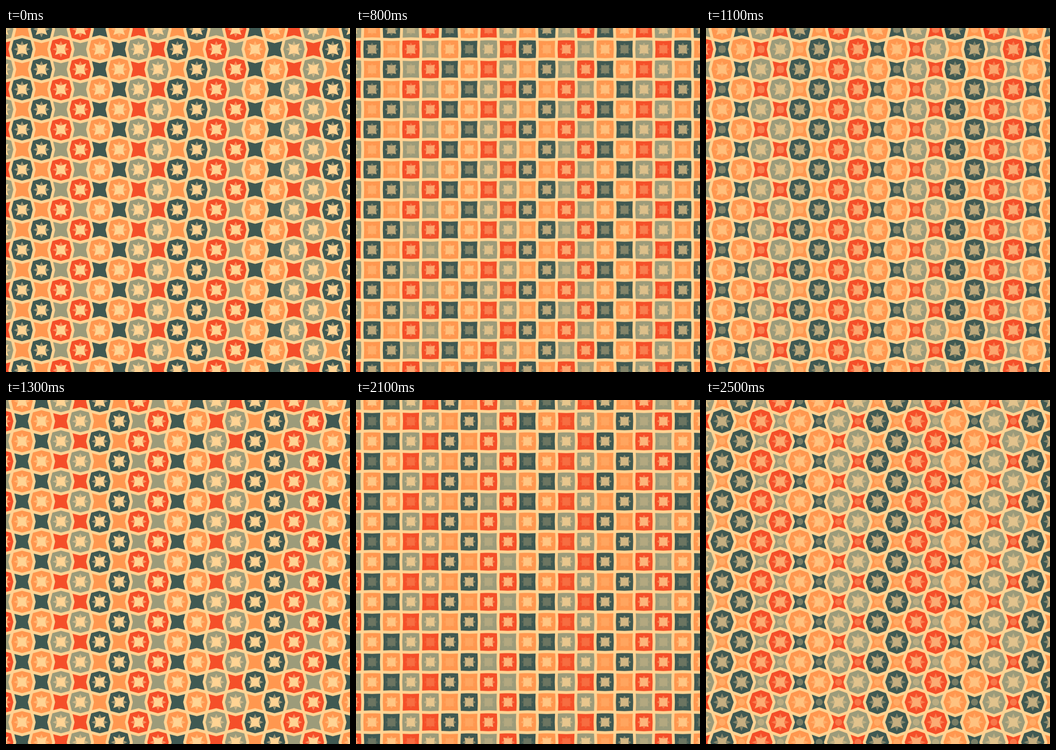
An HTML page with a canvas that plays this animation: 600x600 px, repeating every 2600 ms.

```html
<!DOCTYPE html>
<html lang="en">
<head>
<meta charset="utf-8">
<title>Morphing tiles</title>
<style>
  html, body { margin: 0; width: 100%; height: 100%; overflow: hidden; background: #ffd393; }
  canvas { display: block; width: 100vw; height: 100vh; }
</style>
</head>
<body>
<canvas id="stage" width="600" height="600"></canvas>
<script>
const ctx = document.getElementById('stage').getContext('2d');

const CREAM = [255, 211, 147];
const DARK = [64, 89, 82];
const OLIVE = [156, 155, 122];
const ORANGE = [255, 151, 79];
const RED = [245, 79, 41];
const ROW = [DARK, ORANGE, RED, OLIVE, ORANGE, DARK, OLIVE, RED];

const PITCH_X = 33.875, PITCH_Y = 35;
const ORIGIN_X = 28, ORIGIN_Y = 37;
const LINE = 5;
const CORE = 6.4;

// The first entry of each list is the resting pose; both halves share the bulge.
const BULGE = [4.3, 2.2, 0.7, -0.8, -2.4, -4.2, -6];
const FADE = [
  [0, 0.25, 0.35, 0.45, 0.55, 0.65, 0.75],
  [0, 0.1, 0.23, 0.36, 0.5, 0.6, 0.7]
];

const rgb = c => `rgb(${c.map(Math.round).join()})`;
const mix = (a, b, t) => rgb(a.map((v, i) => v + (b[i] - v) * t));

const cells = [];
for (let row = -2; row <= 17; row++) {
  for (let col = -2; col <= 18; col++) {
    // Odd rows swap the colours within each pair of columns.
    const index = ((col + 8) % 8) ^ (row & 1);
    cells.push({
      x: ORIGIN_X + col * PITCH_X,
      y: ORIGIN_Y + row * PITCH_Y,
      color: ROW[index],
      even: ((row + col) & 1) === 0
    });
  }
}

function polygon(points) {
  ctx.beginPath();
  for (const [x, y] of points) ctx.lineTo(x, y);
  ctx.closePath();
}

function outline({ x, y }, bulge) {
  const w = PITCH_X / 2, h = PITCH_Y / 2;
  polygon([
    [x - w, y - h], [x, y - h - bulge],
    [x + w, y - h], [x + w + bulge, y],
    [x + w, y + h], [x, y + h + bulge],
    [x - w, y + h], [x - w - bulge, y]
  ]);
}

// Four-pointed star: radii alternate between the axes and the diagonals.
function star({ x, y }, axis, diagonal) {
  polygon(Array.from({ length: 8 }, (_, i) => {
    const r = i % 2 ? diagonal : axis;
    const a = i * Math.PI / 4;
    return [x + r * Math.cos(a), y + r * Math.sin(a)];
  }));
}

function draw(half, step) {
  const bulge = BULGE[step];
  const fade = FADE[half][step];
  const pose = cell => {
    const leaving = cell.even === (half === 0);
    return leaving ? [bulge, 1 - fade] : [-bulge, fade];
  };

  ctx.fillStyle = rgb(CREAM);
  ctx.fillRect(0, 0, 600, 600);

  for (const cell of cells) {
    outline(cell, pose(cell)[0]);
    ctx.fillStyle = rgb(cell.color);
    ctx.fill();
  }

  // Every edge belongs to exactly one outward-bulging cell.
  ctx.strokeStyle = rgb(CREAM);
  ctx.lineWidth = LINE;
  ctx.lineJoin = 'miter';
  for (const cell of cells) {
    const b = pose(cell)[0];
    if (b < 0) continue;
    outline(cell, b);
    ctx.stroke();
  }

  for (const cell of cells) {
    const [b, alpha] = pose(cell);
    if (alpha === 0) continue;
    const tip = 11 + 0.8 * b;
    star(cell, tip, CORE);
    ctx.fillStyle = mix(cell.color, CREAM, alpha * 0.5);
    ctx.fill();
    star(cell, CORE, tip);
    ctx.fillStyle = mix(cell.color, CREAM, alpha);
    ctx.fill();
  }
}

const start = performance.now();
let shown = -1;

function tick() {
  const slot = Math.floor((performance.now() - start) % 2600 / 100);
  if (slot !== shown) {
    shown = slot;
    draw(Math.floor(slot / 13), Math.max(0, slot % 13 - 6));
  }
  requestAnimationFrame(tick);
}
tick();
</script>
</body>
</html>
```
